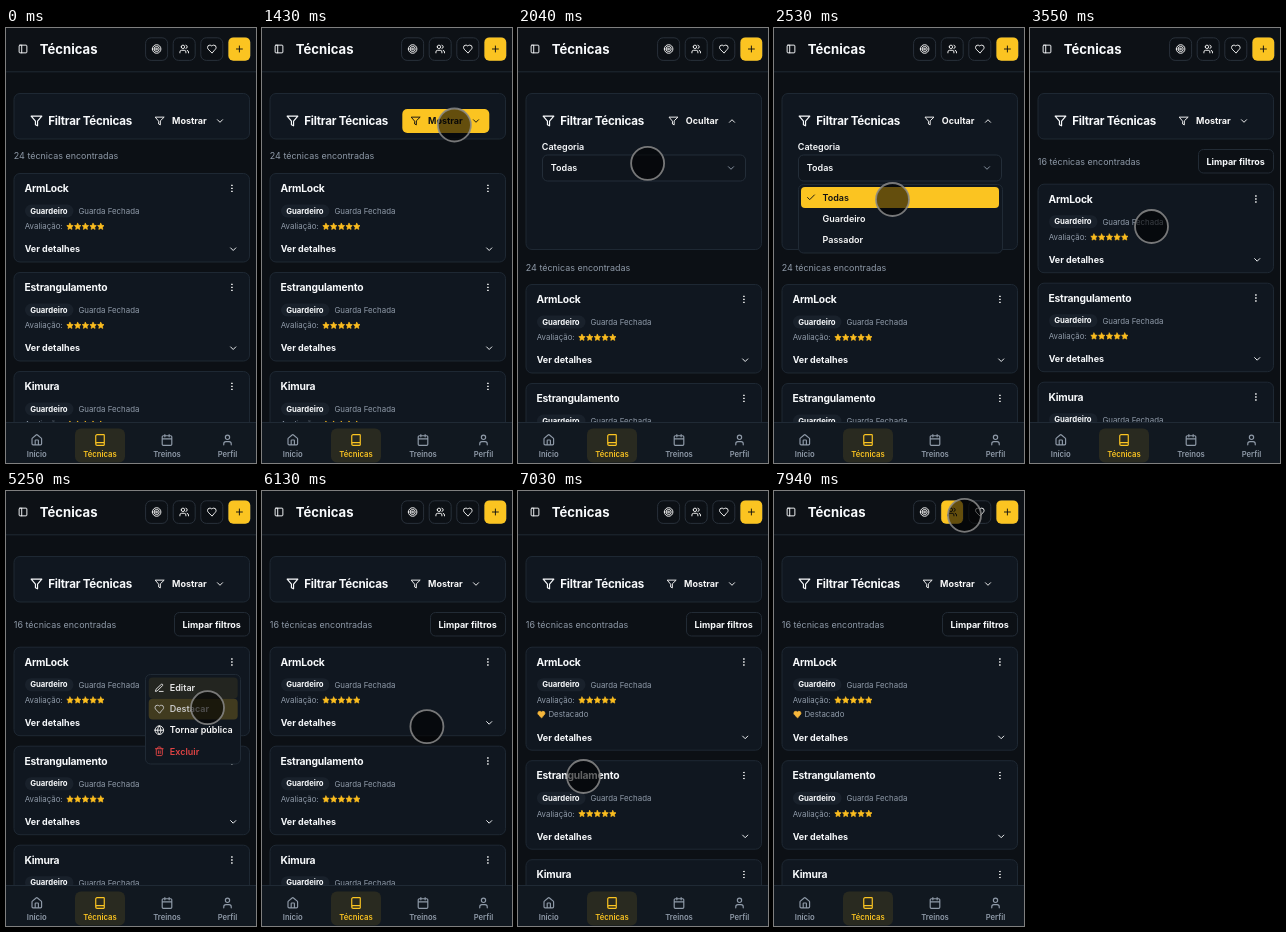
Recreate the animation shown at these times as an HTML page. Size 250 by 435 pixels, loop 8000 ms.

```html
<!DOCTYPE html>
<html lang="pt">
<head>
<meta charset="utf-8">
<title>Técnicas</title>
<style>
html, body { margin: 0; width: 100%; height: 100%; overflow: hidden; background: #0c1015; }
svg { display: block; width: 100vw; height: 100vh; font-family: Inter, sans-serif; }
</style>
</head>
<body>
<svg id="stage" viewBox="0 0 250 435"></svg>
<script>
const LOOP = 8000;
const WHITE = '#f8fafc', GRAY = '#8f9aa8', YELLOW = '#fbc421', RED = '#e04444';
const PAGE = '#0c1015', CARD = '#101720', LINE = '#1e2833';
const SMALL = 7.88, BASE = 9;

const dot = (x, y, r) => `M${x - r} ${y}a${r} ${r} 0 1 0 ${2 * r} 0a${r} ${r} 0 1 0 ${-2 * r} 0`;

// 24-unit icon outlines
const ICONS = {
  panel: 'M5 3h14a2 2 0 0 1 2 2v14a2 2 0 0 1-2 2H5a2 2 0 0 1-2-2V5a2 2 0 0 1 2-2zM9 3v18',
  target: dot(12, 12, 10) + dot(12, 12, 6) + dot(12, 12, 2),
  users: 'M16 21v-2a4 4 0 0 0-4-4H6a4 4 0 0 0-4 4v2M22 21v-2a4 4 0 0 0-3-3.87M16 3.13a4 4 0 0 1 0 7.75' + dot(9, 7, 4),
  heart: 'M19 14c1.49-1.46 3-3.21 3-5.5A5.5 5.5 0 0 0 16.5 3c-1.76 0-3 .5-4.5 2-1.5-1.5-2.74-2-4.5-2A5.5 5.5 0 0 0 2 8.5c0 2.3 1.5 4.05 3 5.5l7 7Z',
  plus: 'M5 12h14M12 5v14',
  filter: 'M22 3H2l8 9.46V19l4 2v-8.54z',
  down: 'm6 9 6 6 6-6',
  up: 'm6 15 6-6 6 6',
  more: dot(12, 5, 1) + dot(12, 12, 1) + dot(12, 19, 1),
  star: 'M12 2l3.09 6.26L22 9.27l-5 4.87 1.18 6.88L12 17.77l-6.18 3.25L7 14.14 2 9.27l6.91-1.01z',
  check: 'M20 6 9 17l-5-5',
  edit: 'M12 20h9M16.5 3.5a2.12 2.12 0 0 1 3 3L7 19l-4 1 1-4Z',
  globe: dot(12, 12, 10) + 'M12 2a14.5 14.5 0 0 0 0 20 14.5 14.5 0 0 0 0-20M2 12h20',
  trash: 'M3 6h18M19 6v14c0 1-1 2-2 2H7c-1 0-2-1-2-2V6M8 6V4c0-1 1-2 2-2h4c1 0 2 1 2 2v2M10 11v6M14 11v6',
  home: 'M15 21v-8a1 1 0 0 0-1-1h-4a1 1 0 0 0-1 1v8M3 10a2 2 0 0 1 .7-1.5l7-6a2 2 0 0 1 2.6 0l7 6A2 2 0 0 1 21 10v9a2 2 0 0 1-2 2H5a2 2 0 0 1-2-2z',
  book: 'M4 19.5v-15A2.5 2.5 0 0 1 6.5 2H19a1 1 0 0 1 1 1v18a1 1 0 0 1-1 1H6.5a1 1 0 0 1 0-5H20',
  calendar: 'M8 2v4M16 2v4M5 4h14a2 2 0 0 1 2 2v14a2 2 0 0 1-2 2H5a2 2 0 0 1-2-2V6a2 2 0 0 1 2-2zM3 10h18',
  user: 'M19 21v-2a4 4 0 0 0-4-4H9a4 4 0 0 0-4 4v2' + dot(12, 7, 4)
};

// x and y name the icon's centre
const icon = (name, x, y, color = WHITE, size = 10.3, fill = 'none') =>
  `<path d="${ICONS[name]}" transform="translate(${x - size / 2} ${y - size / 2}) scale(${size / 24})"
    fill="${fill}" stroke="${color}" stroke-width="2.2" stroke-linecap="round" stroke-linejoin="round"/>`;

// y names the middle of the capitals
const text = (str, x, y, size = BASE, weight = 400, color = WHITE, extra = '') =>
  `<text x="${x}" y="${y + size * 0.36}" font-size="${size}" font-weight="${weight}" fill="${color}" ${extra}>${str}</text>`;

const box = (x, y, w, h, r, fill, stroke = 'none', alpha = 1) =>
  `<rect x="${x}" y="${y}" width="${w}" height="${h}" rx="${r}" fill="${fill}" stroke="${stroke}" opacity="${alpha}"/>`;

const TIGHT = 'letter-spacing="-.02em"';

// Pointer stops: time, x, y
const PATH = [
  [400, 222, 455], [1230, 192.4, 97], [1500, 192.4, 97], [2180, 122, 140], [2330, 118.5, 142],
  [2530, 118.5, 171.5], [2940, 118.5, 191], [3070, 118.5, 191], [3550, 121.5, 198.5], [3870, 98, 195],
  [4650, 222, 172], [4800, 222, 172], [5250, 201.5, 216.7], [5400, 200, 218], [5850, 200, 218],
  [6690, 65.5, 285.5], [7030, 65.5, 285.5], [7240, 56, 301], [7800, 175, 30], [7940, 190.5, 24.3]
];

function pointer(t) {
  const i = PATH.findIndex(p => p[0] > t);
  if (i <= 0) return PATH[i ? PATH.length - 1 : 0].slice(1);
  const [a, b] = [PATH[i - 1], PATH[i]];
  const u = (t - a[0]) / (b[0] - a[0]), e = u * u * (3 - 2 * u);
  return [a[1] + (b[1] - a[1]) * e, a[2] + (b[2] - a[2]) * e];
}

const clamp = v => Math.max(0, Math.min(1, v));

function ink(hover) {
  const v = Math.round(248 - 230 * hover);
  return `rgb(${v},${v},${v})`;
}

function header(usersHover) {
  let s = box(-1, -1, 252, 44.8, 0, '#0d1116', LINE) +
    icon('panel', 17, 21) + text('Técnicas', 33.8, 21, 13.1, 700);
  ['target', 'users', 'heart', 'plus'].forEach((name, i) => {
    const x = 139.6 + 27.6 * i;
    const hover = name === 'plus' ? 1 : name === 'users' ? usersHover : 0;
    s += box(x, 9.8, 22, 22.6, 5.5, PAGE, '#28303a') +
      box(x, 9.4, 21.8, 23.4, 5, YELLOW, 'none', hover) +
      icon(name, x + 11, 21, ink(hover));
  });
  return s;
}

function filterPanel(open, hover, value) {
  const color = ink(hover), dx = open ? 1.8 : 0;
  let s = box(8, 65.5, 235.5, open ? 156 : 45.5, 6, CARD, LINE) +
    icon('filter', 30.5, 93, WHITE, 12.8) +
    text('Filtrar Técnicas', 42.3, 93.2, 11.6, 700, WHITE, TIGHT) +
    box(140.3 + dx, 81, 87 - dx, 24, 5, YELLOW, 'none', hover) +
    icon('filter', 153.5 + dx, 93, color) +
    text(open ? 'Ocultar' : 'Mostrar', 166 + dx, 93.2, BASE, 700, color) +
    icon(open ? 'up' : 'down', 214, 93, color);
  if (open) {
    s += text('Categoria', 23.8, 119, BASE, 600) +
      box(24.5, 127, 203, 26, 5, '#0f151d', '#232d38') +
      text(value, 32.8, 140, BASE, 600) + icon('down', 213, 140, GRAY);
  }
  return s;
}

function card(title, y, moreHover, starred) {
  const extra = starred ? 14.5 : 0;
  let s = box(8, y + .5, 235.5, 88.5 + extra, 6, CARD, LINE) +
    text(title, 18.5, y + 15.5, 10.3, 700, WHITE, TIGHT) +
    box(215, y + 4.5, 22.5, 22.5, 5, YELLOW, 'none', moreHover) +
    icon('more', 226, y + 15.3, ink(moreHover)) +
    box(19, y + 31.5, 48.5, 13, 6.5, '#19212b') +
    text('Guardeiro', 24.2, y + 38, 7.75, 700) +
    text('Guarda Fechada', 72.4, y + 38, SMALL, 400, GRAY) +
    text('Avaliação:', 18.7, y + 53.5, SMALL, 400, GRAY);
  for (let i = 0; i < 5; i++) s += icon('star', 64 + 7.7 * i, y + 53.5, '#fbbd1f', 7.7, '#fbbd1f');
  if (starred) {
    s += icon('heart', 23.4, y + 67.8, '#f6b73c', 8.5, '#f6b73c') +
      text('Destacado', 30.4, y + 67.8, SMALL, 400, GRAY);
  }
  return s + text('Ver detalhes', 18.7, y + 76.2 + extra, BASE, 700) + icon('down', 227.2, y + 76.2 + extra);
}

function options(second) {
  let s = box(24.5, 156.5, 204, 68.5, 5, CARD, '#202a35');
  ['Todas', 'Guardeiro', 'Passador'].forEach((name, i) => {
    const hover = [1 - second, second, 0][i], y = 169.5 + 21 * i;
    s += box(27, y - 10.5, 198, 21, 4, YELLOW, 'none', hover) + text(name, 48.5, y, BASE, 600, ink(hover));
    if (!i) s += icon('check', 37, y, ink(hover));
  });
  return s;
}

function menu(edit, feature) {
  const rows = [['Editar', 'edit', edit], ['Destacar', 'heart', feature], ['Tornar pública', 'globe', 0], ['Excluir', 'trash', 0]];
  let s = box(139.5, 183.5, 95, 89.5, 5, CARD, '#202a35');
  rows.forEach(([name, glyph, hover], i) => {
    const y = 197 + 21.1 * i, color = i === 3 ? RED : ink(hover);
    s += box(142.7, y - 10.4, 89, 20.8, 4, YELLOW, 'none', hover) +
      icon(glyph, 153.3, y, color) + text(name, 163.8, y, BASE, 600, color);
  });
  return s;
}

function nav() {
  let s = box(-1, 394.5, 252, 45, 0, '#111820', '#202a35') + box(69, 400.5, 50, 34, 6, YELLOW, 'none', .1);
  [['Início', 'home', 30.8], ['Técnicas', 'book', 94], ['Treinos', 'calendar', 161], ['Perfil', 'user', 221.5]]
    .forEach(([name, glyph, x], i) => {
      const color = i === 1 ? YELLOW : GRAY;
      s += icon(glyph, x, 412, color, 12.8) +
        text(name, x, 426.3, 7.7, 600, color, 'text-anchor="middle"');
    });
  return s;
}

function scene(t) {
  const within = (a, b) => t >= a && t < b;
  const fade = (a, b) => clamp((t - a) / 150) * (1 - clamp((t - b) / 150));
  const open = within(1560, 3340), filtered = t >= 3340, starred = t >= 6690;
  const shift = open ? 111 : filtered ? 10.7 : 0;
  const [px, py] = pointer(t);

  let s = filterPanel(open, fade(1080, 1660), t < 3140 ? 'Todas' : 'Guardeiro');
  s += text(`${filtered ? 16 : 24} técnicas encontradas`, 7.8, open ? 239.3 : filtered ? 133.3 : 128, 8.95, 400, GRAY);
  if (filtered) s += box(168.5, 121.5, 75, 23.5, 5, PAGE, '#222b35') + text('Limpar filtros', 176.4, 133.3, BASE, 700);
  ['ArmLock', 'Estrangulamento', 'Kimura'].forEach((title, i) => {
    const y = 145 + shift + 99 * i + (starred && i ? 14.5 : 0);
    s += card(title, y, i || t >= 4790 ? 0 : fade(4480, 4790), starred && !i);
  });
  if (within(2320, 3140)) s += options(clamp((t - 2740) / 100));
  if (within(4790, 5900)) s += menu(fade(4980, 5113), fade(5220, 6000));
  s += header(fade(7770, LOOP)) + nav();
  return s + `<circle cx="${px}" cy="${py}" r="16.5" fill="#000" fill-opacity=".6" stroke="#8a8a8a" stroke-opacity=".85" stroke-width="1.8"/>`;
}

const stage = document.getElementById('stage');
const start = performance.now();
function tick() {
  stage.innerHTML = scene((performance.now() - start) % LOOP);
  requestAnimationFrame(tick);
}
tick();
</script>
</body>
</html>
```
